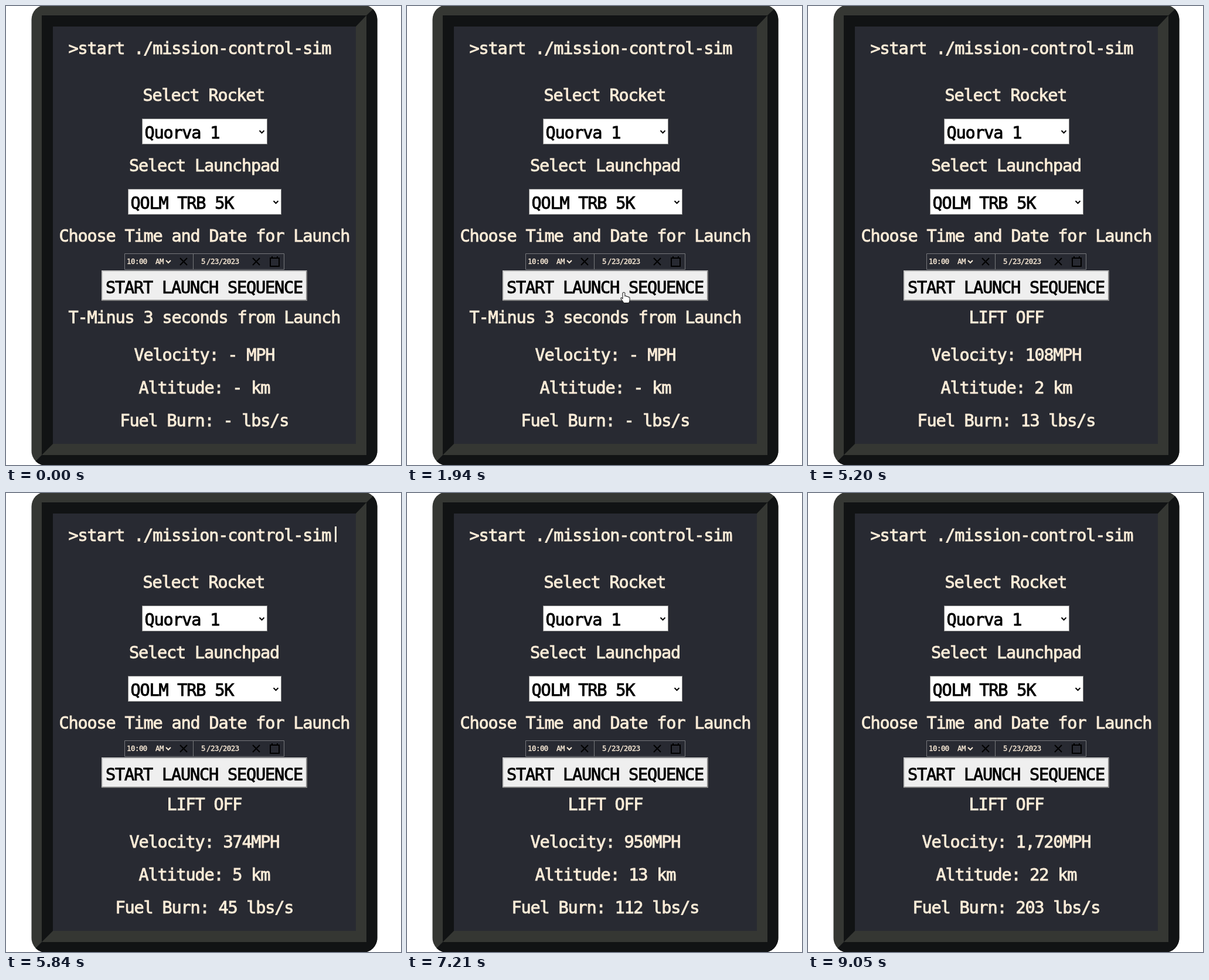
These frames come from a looping animation (674x783 px, 9.13 s). An HTML page:

```html
<!DOCTYPE html>
<html lang="en">
<head>
<meta charset="utf-8">
<title>Mission control sim</title>
<style>
  html, body { margin: 0; width: 100%; height: 100%; overflow: hidden; background: #fff; }
  svg { display: block; width: 674px; height: 783px; }
  text {
    font: 28.6px "DejaVu Sans Mono", "Liberation Mono", monospace;
    letter-spacing: -1.22px;
    fill: #faebd7; stroke: #faebd7; stroke-width: .9px;
  }
  .mid { text-anchor: middle; }
  .dark { fill: #000; stroke: #000; }
  .small { font-size: 12.4px; letter-spacing: -.5px; stroke-width: .35px; }
  .field { fill: #fff; stroke: #858585; }
  .box { fill: none; stroke: #77787c; }
  .icon { fill: none; stroke: #000; stroke-width: 2; }
</style>
</head>
<body>
<svg viewBox="0 0 674 783">
  <defs>
    <clipPath id="rounded"><rect x="43.5" y="-2" width="590" height="786" rx="25"/></clipPath>
    <path id="chevron" d="M0 0l4 4l4-4"/>
    <path id="cross" d="M0 0l12 12M12 0l-12 12"/>
  </defs>

  <!-- Ridge frame -->
  <g clip-path="url(#rounded)">
    <path fill="#353733" d="M43-2H634V784H43z"/>
    <path fill="#111314" d="M634-2V784H43L61 766H615V16z"/>
  </g>
  <path fill="#353733" d="M61 16H615V766H61z"/>
  <path fill="#111314" d="M61 766V16H615L597 35H80V747z"/>
  <path fill="#282a32" d="M80 35H597V747H80z"/>

  <text x="106.4" y="82">&gt;start ./mission-control-sim</text>
  <rect id="caret" x="561" y="57" width="3" height="27" fill="#faebd7"/>

  <text class="mid" x="337.4" y="162">Select Rocket</text>
  <rect class="field" x="232.5" y="192.5" width="213" height="43"/>
  <text class="dark" x="236.4" y="226">Quorva 1</text>
  <use class="icon" href="#chevron" x="432.5" y="212.5"/>

  <text class="mid" x="338" y="282">Select Launchpad</text>
  <rect class="field" x="208.5" y="312.5" width="261" height="43"/>
  <text class="dark" x="212.4" y="346">QOLM TRB 5K</text>
  <use class="icon" href="#chevron" x="456.5" y="332.5"/>

  <text class="mid" x="338.4" y="402">Choose Time and Date for Launch</text>
  <path class="box" d="M202.5 422.5H474.5V449.5H202.5zM319.5 422.5V449.5"/>
  <text class="small" x="206" y="440">10:00</text>
  <text class="small" x="255" y="440">AM</text>
  <use class="icon" href="#chevron" x="273" y="434" style="stroke:#faebd7"/>
  <use class="icon" href="#cross" x="297" y="430"/>
  <text class="small" x="333" y="440">5</text>
  <text class="small" x="342" y="440">/23/2023</text>
  <use class="icon" href="#cross" x="421" y="430"/>
  <path class="icon" d="M451 430H466V444H451zM454 430V427M463 430V427"/>

  <path id="edgeLight" d="M163 451H514L512 453H165V501L163 503z"/>
  <path id="edgeDark" d="M514 451V503H163L165 501H512V453z"/>
  <rect id="face" x="165" y="453" width="347" height="48"/>
  <text class="mid dark" x="338" y="490">START LAUNCH SEQUENCE</text>

  <text class="mid" id="status" x="338.4" y="541"></text>
  <text class="mid" id="velocity" x="338.4" y="605"></text>
  <text class="mid" id="altitude" x="338.4" y="661"></text>
  <text class="mid" id="fuel" x="338.4" y="717"></text>

  <path id="arrow" fill="#111" stroke="#fff" stroke-width="1.2" stroke-linejoin="round"
    d="M0 0V16L3.7 12.6L6.6 19L9.4 17.8L6.6 11.5H11.6z"/>
  <path id="hand" fill="#fff" stroke="#222" stroke-width="1.1" stroke-linejoin="round"
    d="M-2 1.5Q-2-.5 0-.5T1.8 1.5V6Q4 4.7 4.8 6.8Q7 5.8 7.6 7.6Q10 7 10 9.5V13Q10 15 8.4 17.5H0L-5 10.5Q-5.6 8.4-3.7 8.7L-2 10.3z"/>
</svg>
<script>
const LOOP = 9130;
const caretToggles = [410, 900, 1370, 1860, 2350, 2840, 3330, 3910, 4400, 4890,
  5440, 5920, 6400, 6880, 7370, 7850, 8330, 8890];
const statusSteps = [[0, 'T-Minus 3 seconds from Launch'], [2920, 'T-Minus 2 seconds from Launch'],
  [3990, 'T-Minus 1 seconds from Launch'], [4970, 'LIFT OFF']];
const speedPoints = [[4940, 0], [5200, 108], [6400, 607], [7850, 1221], [9050, 1720], [9130, 1753]];

const el = id => document.getElementById(id);
const setText = (id, value) => { if (el(id).textContent !== value) el(id).textContent = value; };
const show = (id, on) => el(id).setAttribute('visibility', on ? 'visible' : 'hidden');
const place = (id, x, y) => el(id).setAttribute('transform', `translate(${x} ${y})`);
const between = (t, from, to) => t >= from && t < to;

// The readouts refresh every 80 ms and stall briefly before 7210 ms.
const refreshTime = t => t < 7210
  ? Math.min(6880, Math.floor(t / 80) * 80)
  : 7210 + Math.floor((t - 7210) / 80) * 80;

function speedAt(t) {
  if (t <= speedPoints[0][0]) return 0;
  const i = speedPoints.findIndex(p => p[0] >= t);
  const [t0, v0] = speedPoints[i - 1], [t1, v1] = speedPoints[i];
  return v0 + (v1 - v0) * (t - t0) / (t1 - t0);
}

function drawReadouts(t) {
  const lifted = t >= 4970;
  const speed = speedAt(refreshTime(t));
  setText('status', statusSteps.filter(s => s[0] <= t).pop()[1]);
  setText('velocity', `Velocity: ${lifted ? Math.round(speed).toLocaleString('en-US') : '- '}MPH`);
  setText('altitude', `Altitude: ${lifted ? Math.ceil(speed * .01275) : '-'} km`);
  setText('fuel', `Fuel Burn: ${lifted ? Math.ceil(speed * .1178) : '-'} lbs/s`);
}

function drawPointer(t) {
  const step = Math.min(9, Math.floor((t - 820) / 78.8));
  const left = Math.pow(1 - Math.max(0, step) / 9, 2.3);
  const x = 370 - 31 * left, y = 489 - 492 * left;
  const onStage = between(t, 820, 4890), passing = between(t, 6320, 6480);
  const overButton = y > 451;
  show('hand', onStage && overButton);
  show('arrow', passing || onStage && !overButton);
  place('hand', x, y);
  place('arrow', passing ? 635 : x, passing ? 485 : y);
}

function drawButton(t) {
  const pressed = between(t, 1860, 1940);
  const edges = ['#c4c4c4', '#858585'];
  el('edgeLight').setAttribute('fill', edges[+pressed]);
  el('edgeDark').setAttribute('fill', edges[+!pressed]);
  el('face').setAttribute('fill', pressed ? '#f5f5f5' : '#efefef');
}

function frame() {
  const t = performance.now() % LOOP;
  show('caret', caretToggles.filter(time => time <= t).length % 2);
  drawReadouts(t);
  drawPointer(t);
  drawButton(t);
  requestAnimationFrame(frame);
}
frame();
</script>
</body>
</html>
```
